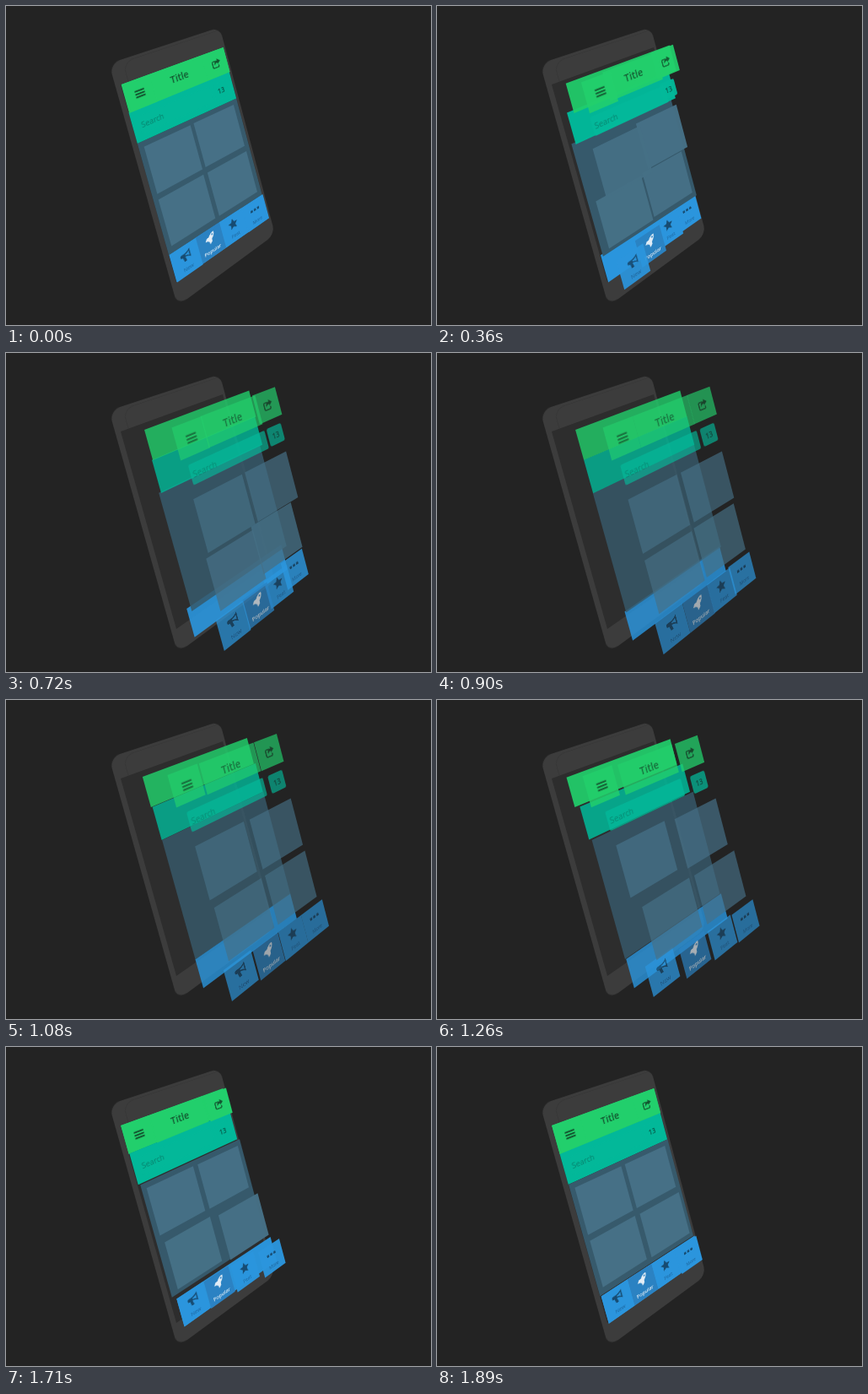
Write an HTML page that moves like this. It is 504x378 px and loops after 1.98 s.

```html
<!DOCTYPE html>
<html>
<head>
<meta charset="utf-8">
<style>
html, body { margin: 0; width: 100%; height: 100%; overflow: hidden; background: #232323; }
body { position: relative; font-family: "Open Sans", "Noto Sans", sans-serif; }
.part { position: absolute; left: 0; top: 0; transform-origin: 0 0; box-sizing: border-box; }
.part > * { position: absolute; }
.text { transform: translate(-50%, -50%); line-height: 1; white-space: nowrap; }
.icon { transform: translate(-50%, -50%); fill: currentColor; fill-rule: evenodd; }
.line { fill: none; stroke: currentColor; stroke-width: 1.7; }
</style>
</head>
<body>
<script>
const LOOP = 1980, STEP = 90, STAGGER = 0.11, PHASE = 0.176;
const W = 160, H = 284, LIFT = 0.068;

// Perspective of the tilted screen; one unit of z lifts a layer by one level.
const VIEW = [
  164.3 / W, -35.7 / W, 0, 0.1684 / W,
  71.4 / H, 242.7 / H, 0, 0.0266 / H,
  250 * LIFT, -121 * LIFT, 1, -LIFT,
  136, 93, 0, 1
].map(n => n.toFixed(7)).join();

const GREEN = '#21cf6b', TEAL = '#02b899', SLATE = '#375a6c', TILE = '#467086', BLUE = '#2a95dd';

const ICONS = {
  menu: '<path d="M1 2.5h14v2.3H1zM1 6.9h14v2.3H1zM1 11.3h14v2.3H1z"/>',
  share: '<path class="line" d="M8.5 4H3.5Q2 4 2 5.5v7Q2 14 3.5 14h7Q12 14 12 12.5V10.5"/>' +
    '<path d="M10.5 .8l5.3 4.4-5.3 4.4V7Q6.5 6.8 5.6 10.5 4 4 10.5 3.4z"/>',
  horn: '<path d="M15 1v11.5Q11 9 7.5 9l1.2 5.5H5.2L4 9H3Q1 9 1 6.8T3 4.6h4Q11 4.6 15 1zM13.4 4Q11 6 8 6.2v1.2q3 .2 5.4 2.2z"/>',
  rocket: '<path d="M15.5.5Q10 .5 7 5L3.5 5.4 1 9l3.4.4 2.2 2.2L7 15l3.6-2.5L11 9q4.5-3 4.5-8.5zM12.5 2.3a1.2 1.2 0 1 1 0 2.4 1.2 1.2 0 1 1 0-2.4z"/>',
  star: '<path d="M8 .8l2.2 4.8 5.2.6-3.9 3.5 1.1 5.1L8 12.2l-4.6 2.6 1.1-5.1L.6 6.2l5.2-.6z"/>',
  dots: '<path d="M.5 6.5h3.6v3.4H.5zM6.2 6.5h3.6v3.4H6.2zM11.9 6.5h3.6v3.4h-3.6z"/>'
};

const parts = [];

function part(x, y, w, h, css, html = '', group = -1, child = -1) {
  const el = document.createElement('div');
  el.className = 'part';
  el.style.cssText = `width:${w}px;height:${h}px;${css}`;
  el.innerHTML = html;
  document.body.append(el);
  parts.push({ el, x, y, group, child });
}

const fill = color => `background:${color};`;
const text = (s, x, y, size, color, css = '') =>
  `<span class="text" style="left:${x}px;top:${y}px;font-size:${size}px;color:${color};${css}">${s}</span>`;
const icon = (name, x, y, size, color) =>
  `<svg class="icon" viewBox="0 0 16 16" width="${size}" height="${size}" style="left:${x}px;top:${y}px;color:${color}">${ICONS[name]}</svg>`;

// Phone
part(-7, -31.5, 170.5, 345.5, fill('#3c3c3c') + 'border-radius:15px');
part(10, -28, 150, 28, 'border:solid #363636;border-width:1px 0 0 1px;border-radius:15px 0 0 0');
part(0, 0, W, H, fill('#2d2d2d'));

// Header
const INK = '#12552f';
part(0, 0, W, 39.5, fill(GREEN), '', 0);
part(0, 0, 39, 39.5, fill(GREEN), icon('menu', 20, 20, 15, INK), 0, 0);
part(39, 0, 82, 39.5, fill(GREEN), text('Title', 41, 19.5, 13.5, INK, 'font-weight:600'), 0, 1);
part(121, 0, 39, 39.5, fill(GREEN), icon('share', 20, 20, 16, INK), 0, 2);

// Search
part(0, 39.5, W, 44, fill(TEAL), '', 1);
part(8, 49, 113, 25, fill(TEAL) + 'border-radius:2px', text('Search', 19, 12.5, 10.3, '#07806b'), 1, 0);
part(126, 49, 25, 25, fill(TEAL) + 'border-radius:3px', text('13', 12.5, 12.5, 10.5, '#085848', 'font-weight:600'), 1, 1);

// Tiles
part(0, 83.5, W, 160.5, fill(SLATE), '', 2);
for (let i = 0; i < 4; i++)
  part(6.5 + i % 2 * 76, 91 + (i >> 1) * 76.5, 70, 68, fill(TILE), '', 2, i);

// Tabs
part(0, 244, W, 40, fill(BLUE), '', 3);
[['horn', 'New'], ['rocket', 'Popular'], ['star', 'Feat'], ['dots', 'More']].forEach(([name, label], i) => {
  const on = i === 1;
  part(i * 40, 244, 40, 40, fill(on ? '#2a82c2' : BLUE),
    icon(name, 20, 14, 17, on ? '#e4eef6' : '#164a70') +
    text(label, 20, 32, 7.3, on ? '#e4eef6' : '#1b629a', on ? 'font-weight:600' : ''), 3, i);
});

// Rise of a layer: eased back and forth, later items lag behind.
function rise(t, order) {
  if (order < 0) return 0;
  const phase = (t * 2 / LOOP + PHASE - STAGGER * order + 2) % 2;
  const x = phase < 1 ? phase : 2 - phase;
  return x < 0.5 ? 4 * x ** 3 : 1 - 4 * (1 - x) ** 3;
}

const fade = p => 1 - 0.2 * p * p;

function draw(now) {
  const t = Math.floor(now % LOOP / STEP) * STEP;
  for (const { el, x, y, group, child } of parts) {
    const a = rise(t, group), b = rise(t, child), z = a + b;
    el.style.transform = `matrix3d(${VIEW}) translate3d(${x}px,${y}px,${z.toFixed(5)}px)`;
    el.style.opacity = fade(a) * fade(b);
    el.style.zIndex = Math.round(z * 1000);
  }
}

const start = performance.now();
function tick() {
  draw(performance.now() - start);
  requestAnimationFrame(tick);
}
tick();
</script>
</body>
</html>
```
